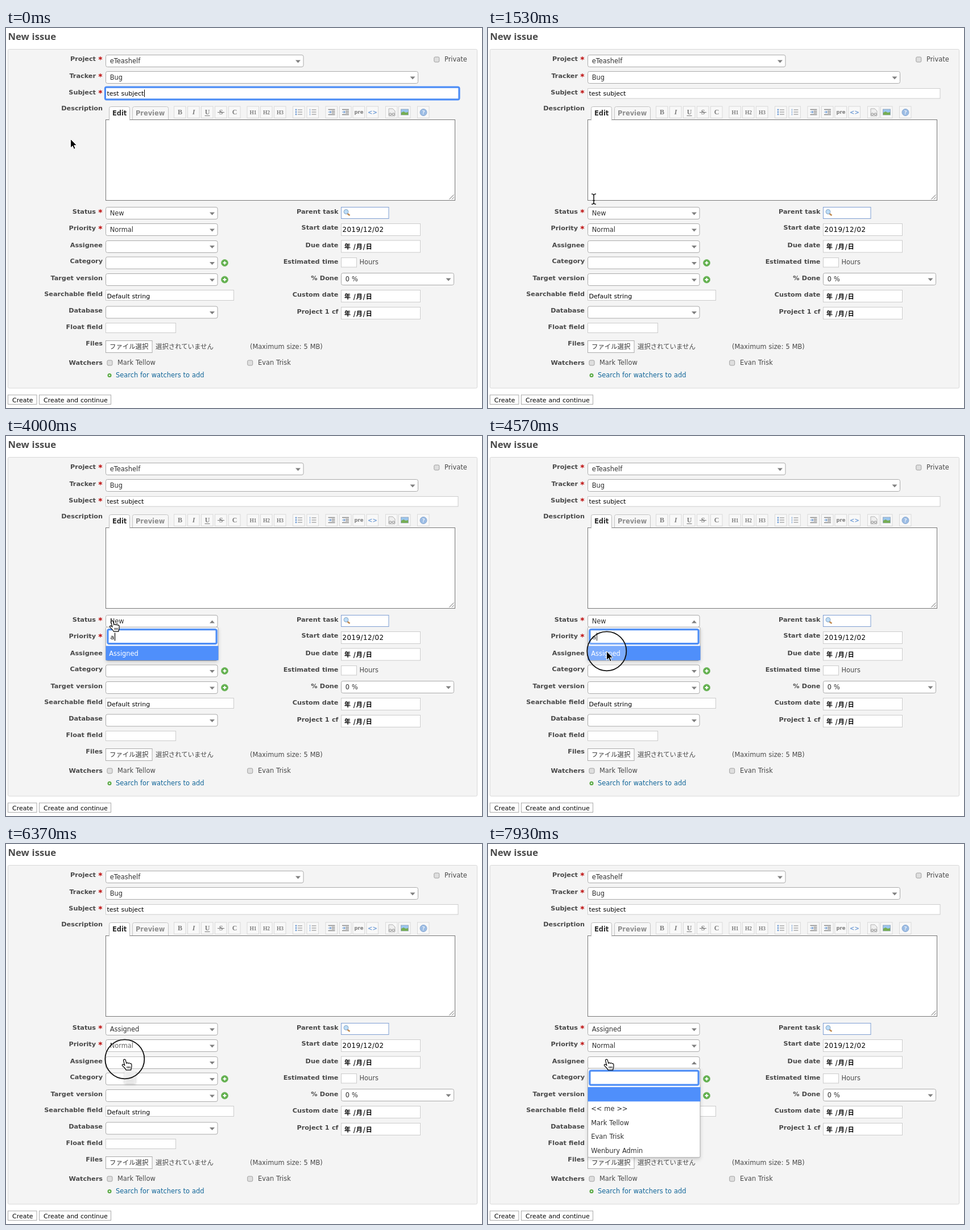
Animation, 837 px wide and 669 px high, one loop 8000 ms. Source, as an HTML page:

```html
<!DOCTYPE html>
<html lang="en">
<head>
<meta charset="utf-8">
<title>New issue</title>
<style>
html, body { margin: 0; width: 100%; height: 100%; overflow: hidden; background: #fff; }
svg { display: block; width: 837px; height: 669px; }
text { font: 11.4px "DejaVu Sans", "Noto Sans CJK JP", sans-serif; word-spacing: .35px; fill: #484848; white-space: pre; }
.dark { fill: #303030; }
.label { font-size: 11.25px; font-weight: 700; fill: #484848; text-anchor: end; }
.star { font-size: 14px; fill: #b00; }
.input { font-size: 11px; fill: #000; }
.date { font-size: 11.8px; letter-spacing: .5px; }
.cjk { font-family: "Noto Sans CJK JP", "Noto Sans CJK", sans-serif; }
.ymd { font-size: 11px; font-weight: 700; letter-spacing: .9px; }
.h { font: 700 16.7px "Open Sans", sans-serif; fill: #4a4a4a; }
.tab { font-weight: 700; }
.tool { font: 700 12px "Liberation Serif", serif; fill: #6c6c6c; text-anchor: middle; }
.small { font-size: 9.5px; }
.pre { font: 700 8.5px "DejaVu Sans", sans-serif; }
.code { font: 700 10px "DejaVu Sans", sans-serif; fill: #5c8fd0; }
.link { fill: #169; }
.white { fill: #fff; }
</style>
</head>
<body>
<svg viewBox="0 0 837 669" xmlns="http://www.w3.org/2000/svg">
  <g id="form"></g>
  <g id="top"></g>
</svg>
<script>
const LOOP = 8000;
const $ = id => document.getElementById(id);

const rect = (x, y, x2, y2, stroke = '#ccc', fill = '#fff', r = 0, w = 1) =>
  `<rect x="${x}" y="${y}" width="${x2 - x}" height="${y2 - y}" rx="${r}" fill="${fill}" stroke="${stroke}" stroke-width="${w}"/>`;
const path = (d, stroke = 'none', fill = 'none', w = 1) =>
  `<path d="${d}" stroke="${stroke}" fill="${fill}" stroke-width="${w}"/>`;
const circle = (x, y, r, fill, stroke = 'none') =>
  `<circle cx="${x}" cy="${y}" r="${r}" fill="${fill}" stroke="${stroke}"/>`;
// y is the middle of the capitals
const text = (s, x, y, cls = '', id = '') =>
  `<text x="${x}" y="${y + 4.1}" class="${cls}" id="${id}">${s.replace(/&/g, '&amp;').replace(/</g, '&lt;')}</text>`;
const group = (id, body, attr = '') => `<g id="${id}" ${attr}>${body}</g>`;

const label = (s, x, y, star) => star
  ? text(s, x - 12, y, 'label') + text('*', x - .5, y + 1.4, 'label star')
  : text(s, x, y, 'label');
const down = (x, y) => path(`M${x - 4.5} ${y - 2.5}h9l-4.5 5z`, 'none', '#808080');
const up = (x, y) => path(`M${x - 4.5} ${y + 2.5}h9l-4.5 -5z`, 'none', '#808080');
const select = (x, x2, y, value = '', id = '') =>
  rect(x, y, x2, y + 21, '#aaa', '#fff', 3) + text(value, x + 7.3, y + 10.3, 'dark', id) +
  (id ? '' : down(x2 - 9.5, y + 11.5));
const box = (x, y) => rect(x, y, x + 9, y + 9, '#a0a0a0', '#dedede', 2);
const plus = y => circle(384.5, y, 6, '#5fae4b', '#86c277') +
  path(`M381.5 ${y}h6M384.5 ${y - 3}v6`, '#fff', 'none', 2);
const ring = (x, y, x2, y2) =>
  rect(x, y, x2, y2, '#b9d2fb', '#fff', 3, 4.4) + rect(x, y, x2, y2, '#4d8df5', '#fff', 2, 3);

function toolbar() {
  const xs = [306, 330, 354, 378, 402, 434.5, 458, 482, 515, 539.5, 572.5, 597, 620.5, 644.5, 678, 701, 734];
  const rows = (x, lead) => [-4, 0, 4].map(d =>
    path(`M${x - 2} ${148 + d}h8`, '#999', 'none', 1.4) + lead(x - 5, 148 + d)).join('');
  const indent = (x, dir) => path(`M${x - 6} 143.5h12M${x} 146.5h6M${x} 149.5h6M${x - 6} 152.5h12`, '#777', 'none', 1.3) +
    path(`M${x - 4 - 2 * dir} 148h4M${x - 4 + dir} 146l${2 * dir} 2l${-2 * dir} 2`, '#5c8fd0', 'none', 1.2);
  const frames = xs.map(x => rect(x - 10.5, 138, x + 10, 158.5, '#dadada', '#f8f8f8')).join('');
  let s = '';
  ['B', 'I', 'U', 'S', 'C'].forEach((c, i) => {
    s += `<text class="tool" x="${xs[i]}" y="152"${c === 'I' ? ' style="font-style:italic"' : ''}>${c}</text>`;
  });
  s += path('M349.5 154.5h9M372 148.5h12', '#666');
  ['H1', 'H2', 'H3'].forEach((c, i) => { s += text(c, xs[5 + i], 147.5, 'tool small'); });
  s += rows(xs[8], (x, y) => circle(x, y, 1.4, '#5c8fd0'));
  s += rows(xs[9], (x, y) => path(`M${x} ${y - 1.5}v3`, '#5c8fd0'));
  s += indent(xs[10], 1) + indent(xs[11], 1);
  s += text('pre', xs[12], 146.5, 'tool pre') + text('<>', xs[13], 148, 'tool code');
  s += path('M673 142h7l4 4v9h-11z', '#aaa', '#eee') + rect(673.5, 150, 678, 153.5, '#777', 'none', 2) +
    rect(679, 150, 683.5, 153.5, '#777', 'none', 2);
  s += rect(694.5, 143, 707.5, 153, '#8aa0b8', '#8fc0ee') + path('M695 153v-4l4-2l4 2l4-1v5z', 'none', '#65a33f');
  s += circle(734, 148.5, 6, '#8fb4e2', '#7d9fcb') + `<text class="tool" style="fill:#fff;font-size:10px" x="734" y="152">?</text>`;
  return frames + `<g opacity=".88">${s}</g>`;
}

function form() {
  let s = text('New issue', 3.5, 16.5, 'h') + rect(3.5, 37.5, 828.5, 634, '#d8d8d8', '#f4f4f4', 2);
  [['Project', 54, 1], ['Tracker', 84, 1], ['Subject', 113, 1], ['Description', 141], ['Status', 323, 1],
   ['Priority', 352, 1], ['Assignee', 381.5], ['Category', 410], ['Target version', 440], ['Searchable field', 468],
   ['Database', 497], ['Float field', 526], ['Files', 555], ['Watchers', 588.5]]
    .forEach(([n, y, star]) => { s += label(n, 170, y, star); });
  [['Parent task', 323], ['Start date', 351], ['Due date', 381.5], ['Estimated time', 411], ['% Done', 440],
   ['Custom date', 468.5], ['Project 1 cf', 499]].forEach(([n, y]) => { s += label(n, 584.5, y); });

  s += select(175.5, 523, 47.5, 'eTeashelf') + select(175.5, 724.5, 76.5, 'Bug');
  s += box(752.8, 51) + text('Private', 771, 54.5);
  s += rect(175.5, 106.5, 795, 124, '#ccc') + group('focus', ring(174.5, 104.3, 796.8, 125.7));
  s += text('test subject', 177.5, 115, 'input') + group('subjectCaret', path('M243.5 108.5v13', '#000'));

  s += rect(175.5, 161.5, 789.5, 303.5, '#777') + path('M779.5 301.5l8-8M784 301.5l3.5-3.5', '#666');
  s += path('M181.5 162.5v-21q0-3 3-3h30q3 0 3 3v21', '#bbb', '#fff');
  s += path('M222.5 161v-19.5q0-3 3-3h57q3 0 3 3v19.5', '#c4c4c4', '#f7f7f7');
  s += text('Edit', 187, 150.3, 'tab dark') + `<g opacity=".6">${text('Preview', 228, 150.3, 'tab')}</g>` + toolbar();

  s += select(175.5, 372, 315.5, 'New', 'status') + select(175.5, 372, 344.5, 'Normal') + select(175.5, 372, 374.5, '', 'assignee');
  s += group('statusDown', down(362.5, 327)) + group('statusUp', up(362.5, 327));
  s += group('assigneeDown', down(362.5, 385.5)) + group('assigneeUp', up(362.5, 385.5));
  s += select(175.5, 372, 403) + select(175.5, 372, 432.5) + select(175.5, 372, 490) + plus(413.5) + plus(443);
  s += rect(175.5, 461.5, 400.5, 479.5) + text('Default string', 177.5, 472, 'input') + rect(175.5, 519.5, 298.5, 536.5);
  s += rect(175.5, 550.5, 257, 571.5, '#aaa') + text('ファイル選択', 182, 561, 'cjk dark') +
    text('選択されていません', 263, 561, 'cjk') + text('(Maximum size: 5 MB)', 429, 561);
  s += box(178, 585) + text('Mark Tellow', 196, 588.5) + box(424.7, 585) + text('Evan Trisk', 443, 588.5);
  s += circle(182, 611.5, 3.5, '#5aaa45') + circle(182, 611.5, 1.3, '#fff') + text('Search for watchers to add', 193, 611, 'link');

  s += rect(589.5, 315.5, 673, 335.5, '#7f9fd3');
  s += path('M600 326.5l4.5 3.5', '#c08a50', 'none', 2.6) + circle(598, 323.5, 4, '#bcdcf7', '#8aa6c4');
  [344.5, 374, 461.5, 491.5].forEach((y, i) => {
    s += rect(589.5, y, 728.5, y + 21) +
      (i ? text('年 /月/日', 595, y + 11, 'cjk input ymd') : text('2019/12/02', 591.5, y + 10.7, 'input date'));
  });
  s += rect(589.5, 404.5, 616.5, 421) + text('Hours', 621.5, 412.3) + select(589.5, 787.5, 431.5, '0 %');
  s += rect(3.5, 646, 54, 662.5, '#aaa') + text('Create', 11, 655, 'input');
  s += rect(58.5, 646, 184.5, 662.5, '#aaa') + text('Create and continue', 66, 655, 'input');
  return s;
}

// The list hangs at y; its first row is highlighted
function menu(id, y, items) {
  const h = 58 + (items.length - 1) * 24.7;
  return group(id, `<g style="filter:drop-shadow(0 3px 3px rgba(0,0,0,.16))">${rect(175.5, 0, 373, h, '#aaa', '#fff', 2)}</g>` +
    ring(179, 4.3, 370, 29) + rect(175.5, 33, 373.5, 58.3, 'none', '#4f8ffb') +
    items.map((n, i) => text(n, 181.3, 46 + i * 24.7, i ? 'dark' : 'white')).join(''),
    `transform="translate(0 ${y})"`);
}

function overlay() {
  let s = menu('listAll', 336.5, ['New', 'Assigned', 'Resolved']) + menu('listOne', 336.5, ['Assigned']) +
    menu('listUsers', 395, ['', '<< me >>', 'Mark Tellow', 'Evan Trisk', 'Wenbury Admin']);
  s += text('a', 183.5, 354.3, 'input', 'typed') + group('caret', path('M0 0v14', '#000', 'none', 1.2));
  s += group('tip', rect(208.5, 401, 227.5, 421.5, 'none', 'rgba(245,245,245,.72)', 1),
    'style="filter:drop-shadow(0 1px 2px rgba(0,0,0,.35))"');
  s += group('press', `<circle r="34.5" fill="#fff" fill-opacity=".25" stroke="#111" stroke-width="1.8"/>`);
  const arrow = path('M0 0V15.5L3.6 12.2L6 17.8L8.6 16.7L6.2 11.2H11Z', '#fff', '#000');
  const beamD = 'M-4-9Q0-9 0-6Q0-9 4-9M0-6V6M-4 9Q0 9 0 6Q0 9 4 9M-2 2.5H2';
  const beam = path(beamD, '#fff', 'none', 3) + path(beamD, '#000', 'none', 1.4);
  const hand = path('M-2 2.2C-2-.3 1.2-.6 1.8 1.6L3.2 7C4 5.6 6 5.8 6.6 7.2C7.6 6 9.2 6.4 9.8 7.8' +
    'C11 7 12.4 7.8 12.4 9.6V13C12.4 15 11.3 16 11.2 18.8H2.6C1.5 16-.6 14.4-3.6 11.6C-5 10-3.6 8.3-1.8 9.2L.2 10.6Z',
    '#000', '#fff', 1.2) + path('M4.6 12.5V16M7 12.5V16M9.4 12.5V16', '#000');
  return s + group('cursor', group('arrow', arrow) + group('beam', beam) + group('hand', hand));
}

$('form').innerHTML = form();
$('top').innerHTML = overlay();

// time, x, y
const track = [[1100, 113.5, 195.5], [1200, 120, 205], [1400, 162, 264], [1530, 186, 301], [1660, 187, 319],
  [1830, 186.5, 325], [4000, 186.5, 325], [4130, 208, 365], [4270, 208, 365], [4500, 208.5, 379]];
const OPEN = 2230, TYPE = 3530, PICK = 4630, USERS = 6400;
const presses = [[2200, 2270], [4570, PICK], [6370, 6430]];

function pointer(t) {
  const i = track.findIndex(p => p[0] > t);
  if (i === 0) return track[0].slice(1);
  if (i < 0) return track[track.length - 1].slice(1);
  const [a, x, y] = track[i - 1], [b, x2, y2] = track[i], k = (t - a) / (b - a);
  return [x + (x2 - x) * k, y + (y2 - y) * k];
}

function shape(x, y, open) {
  if (x < 175) return 'arrow';
  if (y < 304) return 'beam';
  if (open && y > 337) return y < 369 ? 'beam' : 'arrow';
  return y < 315 ? 'arrow' : 'hand';
}

const show = (id, on) => { $(id).style.display = on ? '' : 'none'; };
const blink = since => Math.floor(since / 500) % 2 === 0;

function draw(t) {
  const open = t >= OPEN && t < PICK, typed = open && t >= TYPE, users = t >= USERS;
  show('focus', t < 230);
  show('subjectCaret', t < 230);
  show('listAll', open && !typed);
  show('listOne', typed);
  show('typed', typed);
  show('listUsers', users);
  show('statusUp', open);
  show('statusDown', !open);
  show('assigneeUp', users);
  show('assigneeDown', !users);
  $('status').textContent = t < PICK ? 'New' : 'Assigned';

  const start = users ? 6430 : typed ? TYPE : 2270;
  show('caret', (open || users) && blink(Math.max(0, t - start)));
  $('caret').setAttribute('transform', `translate(${typed ? 191.5 : 184.5} ${users ? 406 : 346.5})`);

  const [x, y] = pointer(t), kind = shape(x, y, open);
  $('cursor').setAttribute('transform', `translate(${x} ${y})`);
  ['arrow', 'beam', 'hand'].forEach(k => show(k, k === kind));
  show('press', presses.some(([a, b]) => t >= a && t < b));
  $('press').setAttribute('transform', `translate(${x + .3} ${y - .2})`);
  show('tip', t >= 6170 && t < USERS);
}

const began = performance.now();
function tick() {
  draw((performance.now() - began) % LOOP);
  requestAnimationFrame(tick);
}
tick();
</script>
</body>
</html>
```
